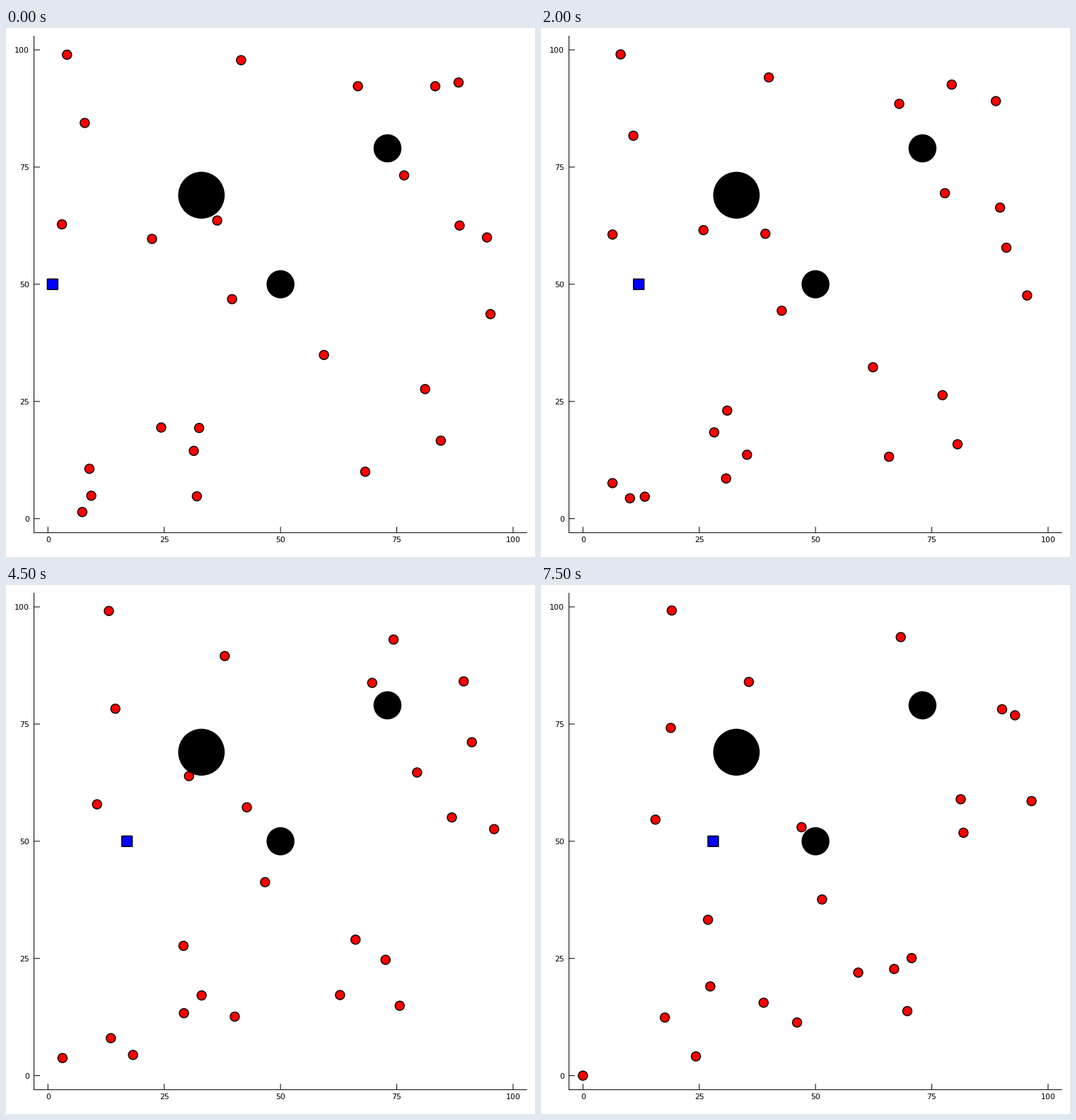
These frames come from a looping animation (748 px wide and 749 px high, 8000 ms). A matplotlib script:

```python
import numpy as np
import matplotlib.pyplot as plt
from matplotlib.animation import FuncAnimation
from matplotlib.patches import Circle, Ellipse, Rectangle

W, H, DPI = 748, 749, 64
PT = 72 / DPI  # points per pixel
FRAMES, STEP_MS = 16, 500
LOW, HIGH = -3, 103  # limits of both axes
UX, UY = 6.577, 6.637  # pixels per unit
INK = "black"

# Walkers: place halfway through the loop and heading in degrees
WALKERS = [
    (11.6, 99.1, 1), (38.6, 90.9, 247), (69.2, 85.2, 290), (75.8, 92.9, 175),
    (89.2, 85.6, 277), (13.4, 79.3, 317), (78.9, 66.1, 288), (9.3, 58.7, 327),
    (29.0, 63.2, 28), (41.7, 58.3, 315), (90.7, 69.7, 73), (88.1, 55.9, 213),
    (95.8, 51.1, 85), (45.5, 42.2, 322), (65.0, 30.0, 319), (74.0, 25.2, 199),
    (77.1, 15.2, 191), (63.7, 16.0, 127), (31.6, 17.5, 345), (29.7, 26.3, 112),
    (38.7, 12.9, 348), (4.1, 4.9, 230), (16.8, 4.5, 357), (12.5, 6.9, 47),
    (29.7, 11.9, 108),
]
OBSTACLES = [(33, 69, 5), (73, 79, 3), (50, 50, 3)]  # x, y, radius
SQUARE_STEPS = (0, 1, 3, 6, 9, 11, 13, 15)
SQUARE_X = (1, 3, 10, 15, 17, 20, 27, 28)


def px(x):
    return 59.3 + UX * x


def py(y):
    return 694.7 - UY * y


def walk(x, y, heading, i):
    """Go one unit per frame in a straight line, staying inside the field."""
    a = np.radians(heading)
    d = i - (FRAMES - 1) / 2
    return np.clip((x + d * np.cos(a), y + d * np.sin(a)), 0, 100)


def rule(x0, y0, x1, y1):
    ax.plot((x0, x1), (y0, y1), color=INK, lw=PT, snap=False,
            solid_capstyle="butt")


def label(x, y, text, ha):
    ax.text(x, y, text, ha=ha, va="baseline", color=INK,
            family="DejaVu Sans", fontsize=11 * PT)


fig = plt.figure(figsize=(W / DPI, H / DPI), dpi=DPI, facecolor="white")
ax = fig.add_axes([0, 0, 1, 1])
ax.set_xlim(0, W)
ax.set_ylim(H, 0)
ax.axis("off")

left, bottom = px(LOW), py(LOW)
rule(left, py(HIGH), left, bottom + 0.5)
rule(left, bottom, px(HIGH), bottom)
for v in range(0, 101, 25):
    rule(left, py(v), left + 8.4, py(v))
    rule(px(v), bottom, px(v), bottom - 8.4)
    label(left - 6.3, py(v) + 4.2, str(v), "right")
    label(px(v), bottom + 13.8, str(v), "center")

edge = dict(ec=INK, lw=1.4 * PT, snap=False)
dots = [ax.add_patch(Circle((0, 0), 6.5, fc="red", zorder=3, **edge))
        for _ in WALKERS]
for x, y, r in OBSTACLES:
    ax.add_patch(Ellipse((px(x), py(y)), 2 * r * UX, 2 * r * UY,
                         fc=INK, ec="none", zorder=4))
SIDE = 15
square = ax.add_patch(Rectangle((0, 0), SIDE, SIDE, fc="blue", zorder=5,
                                joinstyle="miter", **edge))


def draw(i):
    for dot, walker in zip(dots, WALKERS):
        x, y = walk(*walker, i)
        dot.center = px(x), py(y)
    x = round(float(np.interp(i, SQUARE_STEPS, SQUARE_X)))
    square.set_xy((px(x) - SIDE / 2, py(50) - SIDE / 2))
    return [*dots, square]


anim = FuncAnimation(fig, draw, frames=FRAMES, interval=STEP_MS,
                     init_func=lambda: draw(0), repeat=True, repeat_delay=0)
plt.show()
```
